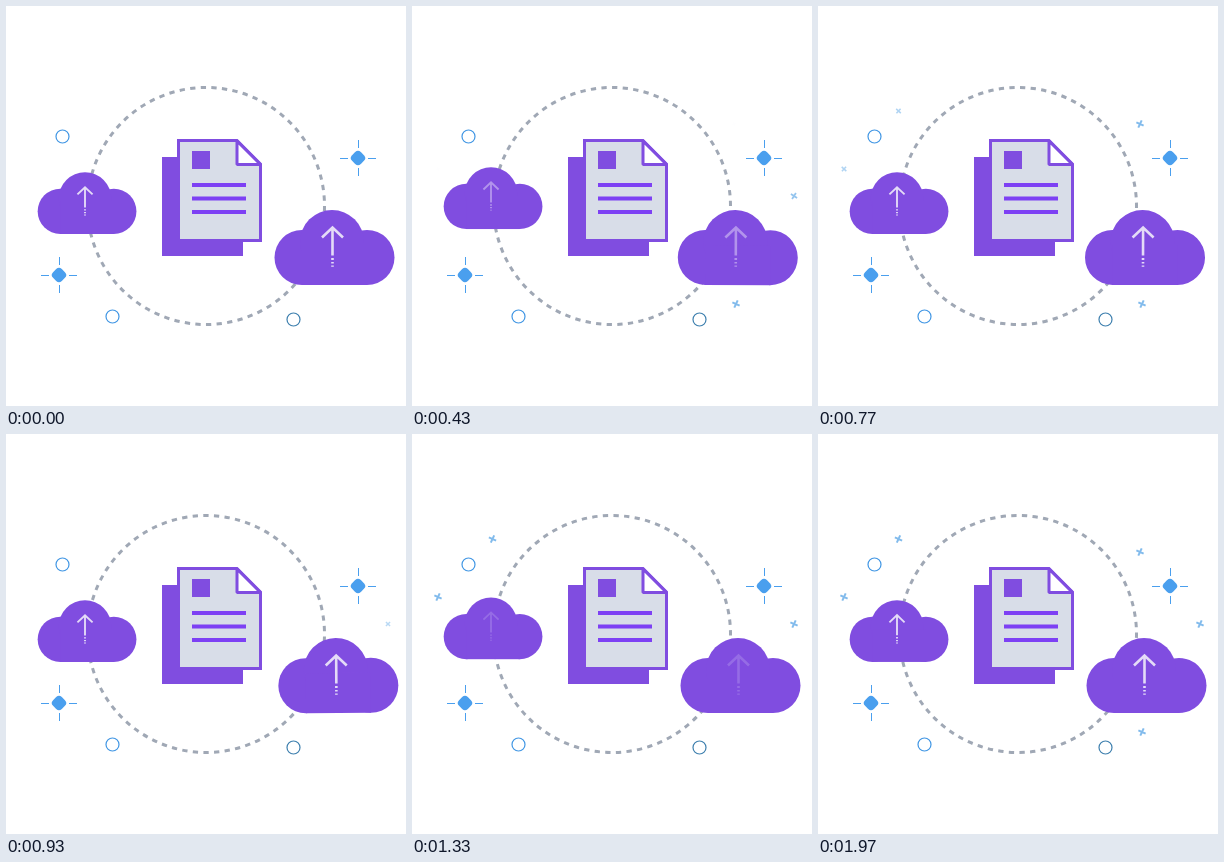
An HTML page that plays this animation: 400 by 400 pixels, repeating every 2.01 s.

```html
<!DOCTYPE html>
<html lang="en">
<head>
<meta charset="utf-8">
<title>Document upload</title>
<style>
  html, body { margin: 0; width: 100%; height: 100%; overflow: hidden; background: #fff; }
  svg { display: block; width: 100vw; height: 100vh; }
</style>
</head>
<body>
<svg viewBox="0 0 400 400">
  <defs>
    <g id="cloud" fill="#804de0">
      <circle cx="-30" cy="-27.5" r="27.5"/>
      <circle cx="35" cy="-27.5" r="27.5"/>
      <circle cx="0" cy="-43" r="32"/>
      <rect x="-30" y="-40" width="65" height="40"/>
    </g>
    <g id="arrow" fill="none" stroke="#e9e3f8" stroke-width="2.6">
      <path d="M-10.5 11L0 1L10.5 11M0 1V29M0 31.5v2M0 35.5v1.6M0 39v1.2"/>
    </g>
    <g id="spark">
      <rect x="-6.2" y="-6.2" width="12.4" height="12.4" rx="4" transform="rotate(45)" fill="#4a9fee"/>
      <path d="M-18 .5h8M10 .5h8M.5 -18v8M.5 10v8" stroke="#4a9fee"/>
    </g>
  </defs>

  <circle id="ring" cx="200" cy="200" r="118.5" fill="none" stroke="#a0a8b5" stroke-width="3"
    pathLength="140" stroke-dasharray="1"/>

  <g fill="none" stroke="#4096e4" stroke-width="1.2">
    <circle cx="56.5" cy="130.5" r="6.5"/>
    <circle cx="106.5" cy="310.5" r="6.5"/>
    <circle cx="287.5" cy="313.5" r="6.5" stroke="#3d7fae"/>
  </g>
  <use href="#spark" x="352" y="152"/>
  <use href="#spark" x="53" y="269"/>
  <g id="marks" stroke="#82bbec" stroke-width="2"></g>

  <path d="M156 151h81v99h-81z" fill="#804de0"/>
  <g stroke="#804de0" stroke-width="3" stroke-linejoin="bevel">
    <path d="M172.5 134.5H231L254.5 158V234.5H172.5Z" fill="#d8dde8" stroke-linejoin="miter"/>
    <path d="M231 135V158.5H254.5Z" fill="#fff"/>
  </g>
  <path d="M186 145h18v18h-18z" fill="#804de0"/>
  <path d="M186 179h54M186 192.5h54M186 206h54" stroke="#7d40f4" stroke-width="4"/>

  <g id="small">
    <use href="#cloud" transform="scale(.823)"/>
    <use class="arrow" href="#arrow" transform="translate(0 -47.5) scale(.72)"/>
  </g>
  <g id="big">
    <use href="#cloud"/>
    <use class="arrow" href="#arrow" transform="translate(.5 -58.5)"/>
  </g>
</svg>
<script>
const LOOP = 2010, FADE = 110;
const $ = id => document.getElementById(id);
const arrows = document.querySelectorAll('.arrow');

// x, y, first and second appearance; the first lasts 40% of the time between them
const marks = [
  [80.5, 105, 430, 1180],
  [26, 163, 430, 1180],
  [322, 118, 430, 1400],
  [382, 190, 110, 870],
  [324, 298, 110, 1800]
];
$('marks').innerHTML = '<path d="M-4 0H4M0 -4V4"/>'.repeat(marks.length);

const clamp = v => Math.min(1, Math.max(0, v));
const ramp = (t, start) => clamp((t - start) / FADE);
// Smooth rise from 0 to 1 and back
const hump = (t, from, to) => Math.sin(Math.PI * clamp((t - from) / (to - from))) ** 2;
const move = (node, value) => node.setAttribute('transform', value);

function draw() {
  const t = performance.now() % LOOP;
  const dy = -5.3 * hump(t, 0, 740) - 3.8 * hump(t, 1000, LOOP);
  const dx = 4 * hump(t, 600, 1240) - 9.8 * hump(t, 330, 890);
  const glow = .95 - .8 * (hump(t, 0, 600) + hump(t, 1000, 1800));

  move($('ring'), `rotate(${36 * t / LOOP} 200 200)`);
  move($('small'), `translate(79 ${228 + dy})`);
  move($('big'), `translate(${326 + dx} 279) rotate(${-dx * .08})`);
  for (const a of arrows) a.setAttribute('opacity', glow);

  marks.forEach(([x, y, on, back], i) => {
    const off = on + .4 * (back - on);
    const shown = ramp(t, on) - ramp(t, off) + ramp(t, back);
    const node = $('marks').children[i];
    node.setAttribute('opacity', shown);
    move(node, `translate(${x} ${y}) rotate(${70 - 45 * shown}) scale(${.4 + .6 * shown})`);
  });
  requestAnimationFrame(draw);
}
draw();
</script>
</body>
</html>
```
